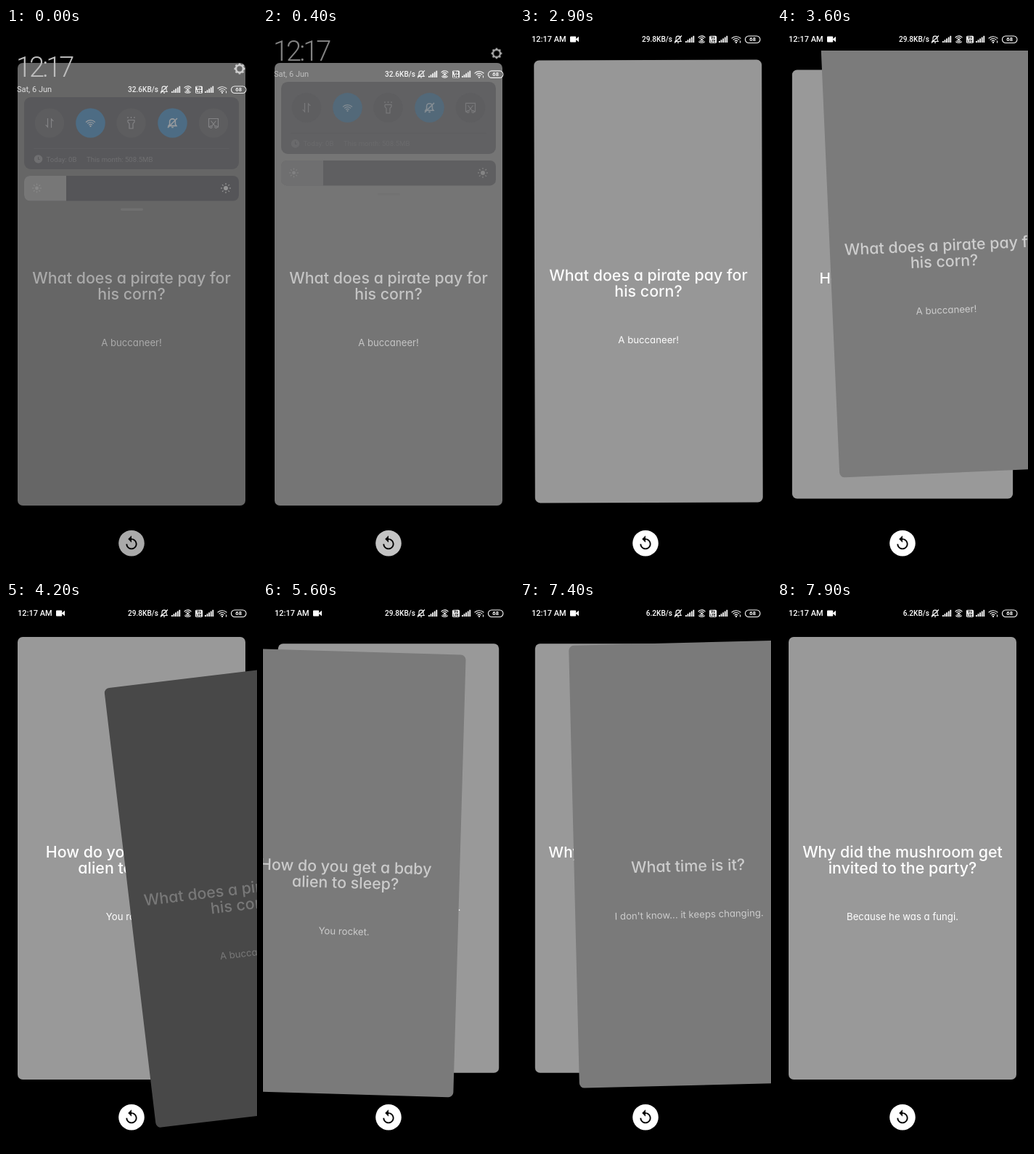
An HTML page with a canvas that plays this animation: 346x750 px, repeating every 8 s.

```html
<!DOCTYPE html>
<html lang="en">
<head>
<meta charset="utf-8">
<title>Joke cards</title>
<style>
  html, body { margin: 0; width: 100%; height: 100%; overflow: hidden; background: #000; }
  #stage { position: relative; width: 346px; height: 750px; overflow: hidden; background: #000; }
  #deck { position: absolute; left: 0; top: 31px; width: 346px; height: 719px; overflow: hidden; }
  .card {
    position: absolute; left: 16px; top: 17px; width: 314px; height: 608px;
    border-radius: 7px; background: #999; color: #fff; text-align: center;
    font-family: Inter, sans-serif; font-feature-settings: "cv11"; white-space: nowrap;
  }
  .card div { position: absolute; left: 0; width: 100%; }
  .title { font-size: 21.4px; font-weight: 500; line-height: 22px; }
  .answer { font-size: 13.2px; line-height: 16px; }
  canvas { position: absolute; left: 0; top: 0; width: 346px; height: 750px; }
</style>
</head>
<body>
<div id="stage"><div id="deck"></div><canvas></canvas></div>
<script>
const W = 346, H = 750, LOOP = 8000, STEP = 100;

const jokes = [
  [["What does a pirate pay for", "his corn?"], "A buccaneer!"],
  [["How do you get a baby", "alien to sleep?"], "You rocket."],
  [["What time is it?"], "I don't know... it keeps changing."],
  [["Why did the mushroom get", "invited to the party?"], "Because he was a fungi."]
];

// One swipe per card: [ms, dx, dy, degrees]
const swipes = [
  [[2800, 0, 0, 0], [3000, 8, -8, -0.3], [3300, 32, -32, -1.4], [3600, 57, -45, -2.5],
   [3800, 88, -18, -3.9], [4000, 124, 24, -5.5], [4200, 154, 50, -6.8],
   [4400, 222, 48, -8], [4600, 330, 46, -9]],
  [[5200, 0, 0, 0], [5400, -18, 6, 0.5], [5600, -59, 20, 1.65], [5700, -122, 50, 3.6],
   [5800, -225, 85, 6], [5900, -345, 125, 8]],
  [[6900, 0, 0, 0], [7200, 22, 2, -0.5], [7400, 58.5, 8, -1.4], [7500, 90, 14, -2.4],
   [7600, 142, 22, -4], [7700, 225, 28, -6], [7800, 340, 30, -8]]
];

const deck = document.getElementById("deck");
const canvas = document.querySelector("canvas");
const ctx = canvas.getContext("2d");
const ratio = window.devicePixelRatio || 1;
canvas.width = W * ratio;
canvas.height = H * ratio;

function addText(card, name, top, html) {
  const el = document.createElement("div");
  el.className = name;
  el.style.top = top + "px";
  el.innerHTML = html;
  card.append(el);
}

const cards = jokes.map(([lines, answer]) => {
  const card = document.createElement("div"), half = 11 * lines.length;
  card.className = "card";
  addText(card, "title", 306 - half, lines.join("<br>"));
  addText(card, "answer", 354 + half, answer);
  deck.prepend(card);
  return card;
});

const clamp = v => Math.max(0, Math.min(1, v));

function pose(keys, t) {
  if (t <= keys[0][0]) return [0, 0, 0];
  const i = keys.findIndex(k => k[0] >= t), a = keys[i - 1], b = keys[i];
  const f = (t - a[0]) / (b[0] - a[0]);
  return [1, 2, 3].map(n => a[n] + (b[n] - a[n]) * f);
}

function placeCards(t) {
  const top = swipes.filter(keys => t >= keys[keys.length - 1][0]).length;
  const [dx, dy, deg] = top < swipes.length ? pose(swipes[top], t) : [0, 0, 0];
  const pull = Math.abs(dx);
  cards.forEach((card, i) => {
    card.style.display = i === top || i === top + 1 ? "block" : "none";
    card.style.filter = i === top && pull ? `brightness(${1 - Math.min(1, pull / 290)})` : "none";
    card.style.transform = i === top
      ? (pull ? `translate(${dx}px, ${dy}px) rotate(${deg}deg)` : "none")
      : `scale(${0.95 + 0.05 * clamp(pull / 150)})`;
  });
}

function ink(color, width = 1) {
  ctx.fillStyle = ctx.strokeStyle = color;
  ctx.lineWidth = width;
}
function box(x, y, w, h, r, stroke) {
  ctx.beginPath();
  ctx.roundRect(x, y, w, h, r);
  stroke ? ctx.stroke() : ctx.fill();
}
function disc(x, y, r) {
  ctx.beginPath();
  ctx.arc(x, y, r, 0, 7);
  ctx.fill();
}
function arc(x, y, r, from, to) {
  ctx.beginPath();
  ctx.arc(x, y, r, from * Math.PI, to * Math.PI);
  ctx.stroke();
}
function line(...p) {
  ctx.beginPath();
  for (let i = 0; i < p.length; i += 2) ctx.lineTo(p[i], p[i + 1]);
  ctx.stroke();
}
function label(text, x, y, size, weight = 400, align = "left") {
  ctx.font = `${weight} ${size}px Roboto, sans-serif`;
  ctx.textAlign = align;
  ctx.fillText(text, x, y);
}
function at(x, y, scale, draw) {
  ctx.save();
  ctx.translate(x, y);
  ctx.scale(scale, scale);
  draw();
  ctx.restore();
}

const replay = new Path2D("M12 5V1L7 6l5 5V7c3.31 0 6 2.69 6 6s-2.69 6-6 6-6-2.69-6-6H4c0 4.42 3.58 8 8 8s8-3.58 8-8-3.58-8-8-8z");
const bell = new Path2D("M-4.2 3H4.2L3 1.2V-1.5C3-5.3-3-5.3-3-1.5V1.2ZM-1 4.6H1M-5 5L5-5");

function wifi(x, y) {
  for (const r of [3.2, 6, 8.8]) arc(x, y, r, 1.24, 1.76);
  disc(x, y - 0.6, 1.1);
}
function bars(x, y) {
  for (let i = 0; i < 5; i++) ctx.fillRect(x + i * 2.6, y - 2 - i * 1.8, 1.8, 2 + i * 1.8);
}

function statusIcons(y, speed) {
  ink("#fff", 1.1);
  label(speed, 210, y + 3.8, 10.1, 500, "right");
  at(218, y, 1, () => ctx.stroke(bell));
  bars(228, y + 4.5);
  bars(274, y + 4.5);
  disc(250.5, y + 0.4, 1.5);
  arc(250.5, y + 0.6, 3, 1.1, 1.9);
  arc(250.5, y + 0.2, 3, 0.15, 0.85);
  arc(250.5, y + 1.4, 6, 1.2, 1.8);
  arc(250.5, y - 1.2, 6, 0.25, 0.75);
  wifi(298, y + 5);
  line(303.5, y + 2, 303.5, y + 5);
  box(310.5, y - 4.5, 20.5, 9.5, 4.7, true);
  label("68", 320.7, y + 2.9, 7.6, 700, "center");
  box(261, y - 4.8, 10, 10, 1.5);
  ink("#000");
  label("Vo", 266, y - 0.2, 5, 700, "center");
  label("LTE", 266, y + 4.2, 4.5, 700, "center");
}

function clockRow() {
  ink("#fff");
  label("12:17 AM", 16, 19.3, 11, 500);
  box(69, 11.5, 8.2, 8, 1);
  ctx.beginPath();
  ctx.moveTo(76.5, 15.5);
  ctx.lineTo(81, 11.8);
  ctx.lineTo(81, 19.2);
  ctx.fill();
}

function replayButton() {
  ink("#fff");
  disc(173, 707.7, 17.8);
  ink("#000");
  at(161.6, 696.4, 0.95, () => ctx.fill(replay));
}

function sun(x, y, r) {
  disc(x, y, r);
  for (let i = 0; i < 8; i++) {
    const c = Math.cos(i * Math.PI / 4), s = Math.sin(i * Math.PI / 4);
    line(x + c * (r + 1.8), y + s * (r + 1.8), x + c * (r + 4), y + s * (r + 4));
  }
}

function gear(x, y) {
  ink("#ccc", 2.6);
  arc(x, y, 5, 0, 2);
  for (let i = 0; i < 8; i++) {
    const c = Math.cos(i * Math.PI / 4), s = Math.sin(i * Math.PI / 4);
    line(x + c * 5, y + s * 5, x + c * 7.5, y + s * 7.5);
  }
}

function toggles() {
  [60, 116.5, 172.5, 229.5, 286].forEach((x, i) => {
    ink(i % 2 ? "#4d6c84" : "#5d5d5f");
    disc(x, 130.5, 20.3);
  });
  ink("#838385", 1.2);
  line(57.5, 124, 57.5, 136, 54.8, 133.2);
  line(62.5, 137, 62.5, 125, 65.2, 127.8);
  line(168, 126.5, 177, 126.5, 177, 129, 175, 131.5, 175, 138, 170, 138, 170, 131.5, 168, 129, 168, 126.5);
  for (const x of [168, 172.5, 177]) line(x, 124, x, 122);
  line(282, 136, 279.5, 136, 279.5, 124.5, 292.5, 124.5, 292.5, 136, 290, 136);
  line(282.5, 127.5, 288.5, 135);
  line(289.5, 127.5, 283.5, 135);
  arc(282.5, 136, 1.5, 0, 2);
  arc(289.5, 136, 1.5, 0, 2);
  ink("#989b9e", 1.2);
  wifi(116.5, 135.5);
  at(229.5, 130.5, 1.3, () => ctx.stroke(bell));
}

function shade() {
  ink("#bcbcbc");
  ctx.letterSpacing = "-3px";
  label("12:17", 14, 66.5, 38, 300);
  ctx.letterSpacing = "0px";
  ink("#ddd");
  label("Sat, 6 Jun", 15, 88, 11);
  gear(322, 56);

  ink("#58585b");
  box(25, 95, 296, 99, 9);
  toggles();
  ink("#5d5d60");
  ctx.fillRect(38, 165, 270, 1);
  ink("#6f6f71", 1);
  disc(44.5, 180, 5.8);
  label("Today: 0B", 55.5, 183.5, 9.6);
  label("This month: 508.5MB", 111, 183.5, 9.6);
  ink("#58585b");
  line(44.5, 177, 44.5, 180.5, 46.5, 180.5);

  ink("#555558");
  box(25, 203, 296, 34.5, 8);
  ink("#777");
  box(25, 203, 58, 34.5, [8, 0, 0, 8]);
  ink("#888", 1.2);
  sun(42.5, 220, 2.4);
  ink("#949494", 1.2);
  sun(303, 220, 3);
  ink("#707070");
  box(158, 247.5, 31, 3.5, 1.7);
}

function render(ms) {
  const t = Math.floor(ms % LOOP / STEP) * STEP;
  const f = clamp((t - 300) / 600), shut = 1 - (1 - f) ** 2;
  placeCards(t);

  ctx.setTransform(ratio, 0, 0, ratio, 0, 0);
  ctx.clearRect(0, 0, W, H);
  replayButton();
  if (shut < 1) {
    ink(`rgba(0, 0, 0, ${0.335 * (1 - shut)})`);
    ctx.fillRect(0, 0, W, H);
    ctx.globalAlpha = 1 - shut;
    at(0, -69 * shut, 1, shade);
  }
  ctx.globalAlpha = clamp(shut * 2 - 1);
  clockRow();
  ctx.globalAlpha = 0.88 + 0.12 * shut;
  statusIcons(84.5 - 69 * shut, t < 2400 ? "32.6KB/s" : t < 6200 ? "29.8KB/s" : "6.2KB/s");
  ctx.globalAlpha = 1;
}

const start = performance.now();
function tick() {
  render(performance.now() - start);
  requestAnimationFrame(tick);
}
tick();
</script>
</body>
</html>
```
